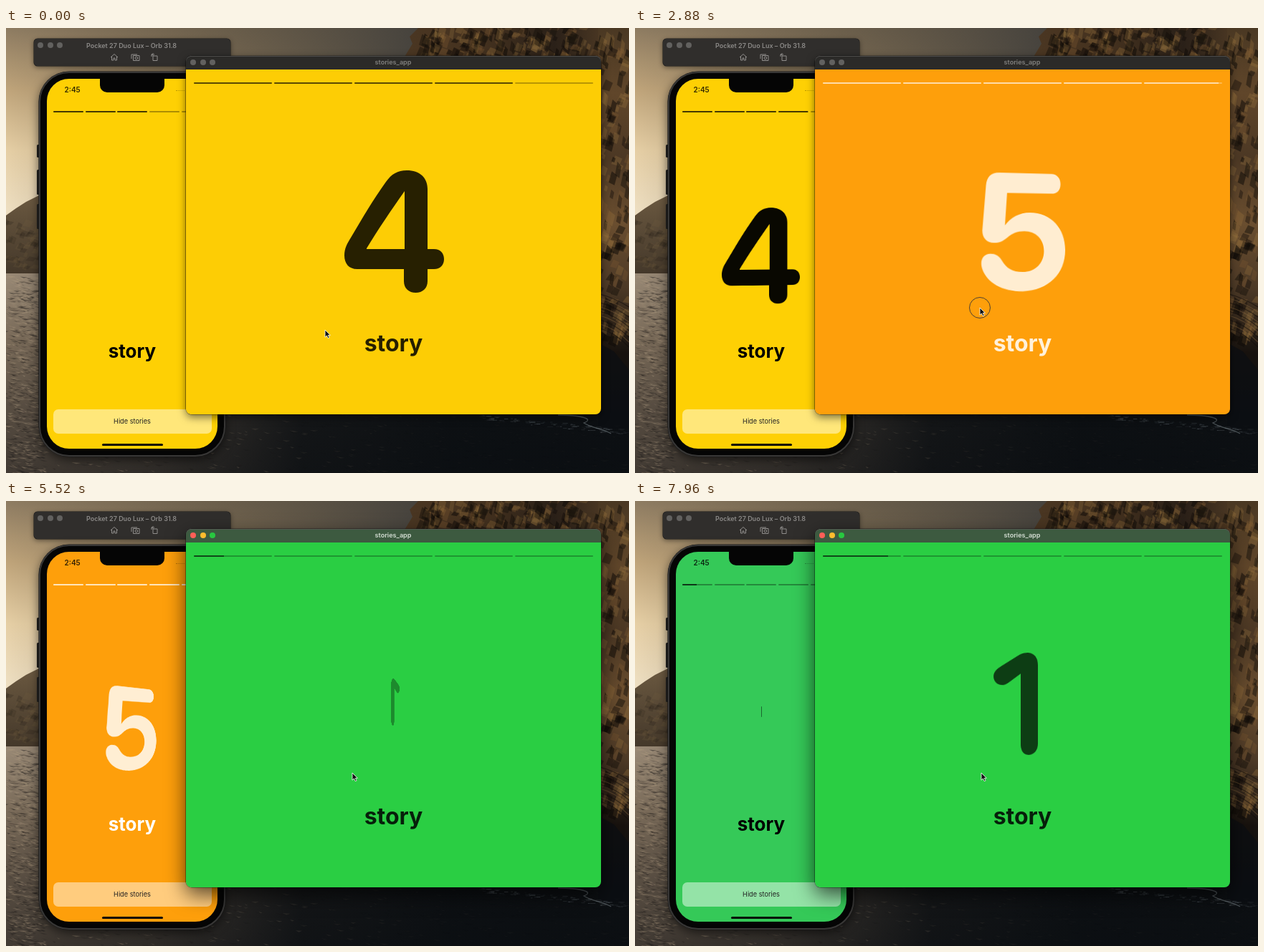
Recreate the animation shown at these times as an HTML page with a canvas. Size 869 by 622 pixels, loop 8000 ms.

```html
<!DOCTYPE html>
<html lang="en">
<head>
<meta charset="utf-8">
<title>Stories</title>
<style>
  html, body { margin: 0; width: 100%; height: 100%; overflow: hidden; background: #17191c; }
  body { position: relative; font-family: Inter, Roboto, sans-serif; }
  #stage { position: absolute; left: 0; top: 0; width: 869px; height: 622px; overflow: hidden; }
  #stage div, #stage svg, #stage canvas { position: absolute; box-sizing: border-box; }
  .center { transform: translate(-50%, -50%); white-space: nowrap; line-height: 1; }
  .light { width: 8px; height: 8px; border-radius: 50%; background: #62615f; }

  #toolbar { left: 39px; top: 15px; width: 274px; height: 38px; border-radius: 5px;
    background: #302e2c; box-shadow: 0 0 0 .5px #1b1a19, 0 2px 7px #0007; }
  #toolbar .center { left: 136px; top: 9px; font-size: 9px; font-weight: 600; color: #8b8987; }
  #toolbar svg { left: 0; top: 0; fill: none; stroke: #8f8d8b; stroke-width: 1; }

  #body { left: 46px; top: 61px; width: 260px; height: 538px; border-radius: 42px; background: #050505;
    border: 2px solid #383736; box-shadow: 0 0 0 .6px #181818, 0 4px 14px #0009; }
  .key { left: 42.5px; width: 4px; border-radius: 1.5px; background: #242321; }
  #phone { left: 57px; top: 71px; width: 238px; height: 517px; border-radius: 31px; overflow: hidden; }
  #notch { left: 74px; top: -4px; width: 90px; height: 23px; border-radius: 0 0 10px 10px; background: #050505; }
  #clock { left: 24.5px; top: 9.5px; font-size: 10px; font-weight: 600; line-height: 1; color: #000c; }
  #signal { left: 180px; top: 15.5px; width: 12px; border-top: 1.5px dotted #0004; }
  #hide { left: 9px; top: 462px; width: 221px; height: 34px; border-radius: 7px; background: #ffffff78; }
  #hide .center { left: 110px; top: 17px; font-size: 9.2px; color: #222; }
  #home { left: 77px; top: 510px; width: 85px; height: 3px; border-radius: 2px; background: #080808; }

  #window { left: 251px; top: 39px; width: 579px; height: 501px; border-radius: 8px;
    box-shadow: 0 0 0 .6px #0009, 0 4px 12px #0008; }
  #window.active { box-shadow: 0 0 0 .6px #0009, 0 10px 28px #000a; }
  #titlebar { left: 0; top: 0; width: 579px; height: 18.5px; border-radius: 8px 8px 0 0;
    background: #2b2a28; box-shadow: inset 0 .7px #5a5957; }
  #titlebar .center { left: 289px; top: 9px; font-size: 9.1px; font-weight: 600; color: #81807e; }
  .active #titlebar .center { color: #d3ddd2; }
  .active .light:nth-child(1) { background: #ff5f57; }
  .active .light:nth-child(2) { background: #febc2e; }
  .active .light:nth-child(3) { background: #28c840; }
  #mac { left: 0; top: 18.5px; width: 579px; height: 482.5px; border-radius: 0 0 8px 8px; overflow: hidden; }

  .bar { height: 2px; border-radius: 1px; overflow: hidden; }
  .bar::before { content: ""; position: absolute; inset: 0; background: currentColor; opacity: .32; }
  .bar div { left: 0; top: 0; height: 2px; background: currentColor; opacity: .6; }
  .digit { width: 200px; height: 200px; overflow: visible; fill: currentColor; }
  .word { font-weight: 700; }
  #cursor, #press { left: 0; top: 0; overflow: visible; }
  #press { width: 30px; height: 30px; margin: -15px; border: 1.4px solid #24283ccc; border-radius: 50%; }
</style>
</head>
<body>
<div id="stage">
  <canvas id="scene" width="869" height="622"></canvas>

  <div id="toolbar">
    <div class="light" style="left:5px;top:5px"></div>
    <div class="light" style="left:18.5px;top:5px"></div>
    <div class="light" style="left:32px;top:5px"></div>
    <div class="center">Pocket 27 Duo Lux – Orb 31.8</div>
    <svg width="274" height="38">
      <path d="M107 26l5-4.5 5 4.5M108.5 25v5h2.5v-3h2v3h2.5v-5"/>
      <path d="M136 28v-6h8M138.500 23.500h8.500v7h-8.500zM141 27a1.800 1.800 0 1 0 3.600 0a1.800 1.800 0 1 0 -3.600 0"/>
      <path d="M166 24h6v6.500h-6zM164 25v-3h4M166.500 20.500l-2.500 1.500 2.500 1.500"/>
    </svg>
  </div>

  <div class="key" style="top:163px;height:18px"></div>
  <div class="key" style="top:198px;height:35px"></div>
  <div class="key" style="top:246px;height:35px"></div>
  <div id="body"></div>
  <div id="phone">
    <div id="notch"></div>
    <div id="clock">2:45</div>
    <div id="signal"></div>
    <div id="hide"><div class="center">Hide stories</div></div>
    <div id="home"></div>
  </div>

  <div id="window">
    <div id="titlebar">
      <div class="light" style="left:6px;top:5px"></div>
      <div class="light" style="left:19.5px;top:5px"></div>
      <div class="light" style="left:33px;top:5px"></div>
      <div class="center">stories_app</div>
    </div>
    <div id="mac"></div>
  </div>

  <div id="press"></div>
  <svg id="cursor" width="12" height="14">
    <path d="M0 0V10.200L2.400 8 4.200 11.600 6 10.800 4.300 7.300H7.400Z" fill="#111" stroke="#fff" stroke-width=".8"/>
  </svg>
</div>

<script>
const $ = id => document.getElementById(id);
const LOOP = 8000, STEP = 40, FOCUS = 2920;

// Digit outlines share the pivot (541, 279).
const DIGITS = {
  1: "M537 353V234L514 250C501 259 488 252 488 241C488 234 493 229 501 224L531 205C539 200 545 198 552 198C565 198 571 206 571 218V353C571 364 564 371 554 371C544 371 537 364 537 353Z",
  4: "M555 354V337H490C478 337 472 329 472 318C472 308 476 301 481 293C497 266 512 240 530 215C538 204 546 199 559 199C577 199 588 209 588 225V309H597C606 309 611 315 611 323C611 331 606 337 597 337H588V354C588 364 581 370 571.5 370C562 370 555 364 555 354ZM556 228C537 255 520 280 503 308V309H556Z",
  5: "M508 203H582C590 203 595 209 595 217C595 226 590 231 582 231H519L516 276C524 265 536 258 551 258C581 258 602 280 602 311C602 345 577 368 541 368C512 368 491 354 485 336C481 324 486 315 496 315C503 315 508 318 512 325C518 335 526 341 541 341C559 341 571 329 571 312C571 295 559 284 543 284C533 284 526 287 519 293C513 298 508 300 501 300C491 300 485 293 485 283L490 221C491 209 497 203 508 203Z"
};
const GROW = { 5: 1.05 };
const DARK = "0,0,0", PALE = "255,255,255";
const THEMES = {
  1: { mac: "#2ace43", phone: "#35c958", ink: DARK, title: "#3d5a40" },
  4: { mac: "#fdcd05", phone: "#fed004", ink: DARK, title: "#5c5130" },
  5: { mac: "#fe9f0b", phone: "#fe9f0b", ink: PALE, title: "#5c4a30" }
};

// Whole part = stories finished, fraction = progress of the current one.
const MAC_RUN = [[0, 4], [2860, 4.953], [3670, 4.953], [4580, 5.257], [5126, 5.257],
  [6200, 5.61], [6500, 5.71], [7585, 5.71], [7960, 5.835]];
const PHONE_RUN = [[0, 3], [2980, 4], [4680, 4.573], [6130, 5], [6200, 5.023], [7960, 5.486]];
const HOLDS = [[2860, 3670], [4580, 5126], [6500, 7585]];
const POINTER = [[0, 445, 422], [1120, 461, 407], [1920, 475, 392], [2500, 481, 391],
  [3670, 481, 391], [4500, 483, 380], [8000, 483, 380]];

function track(keys, t, column = 1) {
  const i = keys.findIndex(k => k[0] > t);
  if (i < 0) return keys[keys.length - 1][column];
  const a = keys[i - 1], b = keys[i];
  return a[column] + (b[column] - a[column]) * (t - a[0]) / (b[0] - a[0]);
}

function add(parent, className, style, html = "") {
  const el = document.createElement("div");
  el.className = className;
  el.style.cssText = style;
  el.innerHTML = html;
  parent.prepend(el);
  return el;
}

function makePlayer(root, o) {
  const fills = [0, 1, 2, 3, 4].map(i => add(root, "bar",
    `left:${o.barX + i * o.barStep}px;top:${o.barY}px;width:${o.barWidth}px`, "<div></div>").firstChild);
  add(root, "word center", `left:${o.x}px;top:${o.wordY}px;font-size:${o.wordSize}px`, "story");
  root.insertAdjacentHTML("afterbegin",
    `<svg class="digit" viewBox="441 179 200 200" style="left:${o.x - 100}px;top:${o.y - 100}px"><path fill-rule="evenodd"/></svg>`);
  const svg = root.firstChild, path = svg.firstChild;

  return units => {
    const done = Math.floor(units) % 5, p = units % 1, story = done + 1, theme = THEMES[story];
    root.style.background = theme[root.id];
    root.style.color = `rgba(${theme.ink},${o.alpha})`;
    fills.forEach((f, i) => f.style.width = 100 * Math.max(0, Math.min(1, done + p - i)) + "%");
    path.setAttribute("d", DIGITS[story]);
    path.setAttribute("transform", `translate(541 279) scale(${GROW[story] || 1}) translate(-541 -279)`);
    svg.style.opacity = p;
    svg.style.transform = `scale(${o.scale * p}) perspective(450px) rotateY(${180 * (1 - p)}deg)`;
    return theme;
  };
}

const showPhone = makePlayer($("phone"), { x: 119, y: 243, scale: .816, alpha: 1,
  barX: 9, barY: 45, barStep: 44.7, barWidth: 42, wordY: 381, wordSize: 26 });
const showMac = makePlayer($("mac"), { x: 289.5, y: 221.5, scale: 1, alpha: .85,
  barX: 11, barY: 18.5, barStep: 112, barWidth: 109, wordY: 383.5, wordSize: 32 });

function paintScene() {
  const c = $("scene").getContext("2d");
  let seed = 11;
  const rnd = (a, b) => {
    seed = (seed * 16807) % 2147483647;
    return a + (b - a) * seed / 2147483647;
  };
  const gradient = (x1, y1, x2, y2, ...colors) => {
    const g = c.createLinearGradient(x1, y1, x2, y2);
    colors.forEach((col, i) => g.addColorStop(i / (colors.length - 1), col));
    return g;
  };
  const shape = (fill, ...pts) => {
    c.fillStyle = fill;
    c.beginPath();
    pts.forEach(p => c.lineTo(...p));
    c.fill();
  };
  const rect = (fill, x, y, w, h) => { c.fillStyle = fill; c.fillRect(x, y, w, h); };
  // A slanted sliver of rock
  const shard = (fill, x, y, w, h) =>
    shape(fill, [x, y], [x + w, y + h * .3], [x + w * .5, y + h], [x - w * .6, y + h * .8]);

  // Sky and distant hill
  rect(gradient(0, 0, 0, 343, "#8d7b61", "#bfa47a", "#e6cfa5", "#eedfc2", "#dcc3a0"), 0, 0, 869, 343);
  rect(gradient(0, 0, 580, 0, "#5a504000", "#5a5040aa", "#45423d"), 0, 0, 869, 343);
  shape(gradient(0, 235, 0, 343, "#6a5840", "#44382a"),
    [0, 262], [14, 252], [28, 243], [46, 234], [60, 230], [60, 343], [0, 343]);
  for (let i = 0; i < 50; i++)
    shard(i % 2 ? "#80694422" : "#20191533", rnd(0, 46), rnd(266, 332), rnd(4, 10), rnd(5, 12));

  // Sea
  rect(gradient(0, 343, 0, 622, "#9a8a76", "#7a6b59", "#5a4f43", "#413a33"), 0, 343, 869, 279);
  rect(gradient(0, 0, 620, 0, "#080c1000", "#080c1055", "#080c10d8", "#080c10f0"), 0, 343, 869, 279);
  for (let i = 0; i < 2200; i++) {
    const x = rnd(-8, 869) * (i % 3 ? 1 : .06), y = rnd(345, 622), w = rnd(4, 14);
    const fade = Math.max(.1, 1 - x / 620), a = .42 * fade * rnd(.4, 1);
    shape(`rgba(${i % 2 ? "22,20,20" : "176,156,130"},${a})`,
      [x, y], [x + w, y + rnd(0, 3)], [x + w * .5, y + 2.4]);
  }

  // Cliff
  shape(gradient(555, 0, 869, 0, "#4a3622", "#45321f", "#2a2018", "#5c4429"),
    [575, 0], [563, 12], [567, 22], [556, 40], [620, 60], [869, 60], [869, 0]);
  rect(gradient(0, 0, 0, 545, "#4a3823", "#60462a", "#4c3824", "#6a4e2f", "#4c3926", "#17120e", "#0c0f12"),
    826, 0, 43, 545);
  const rock = ["#0f0b0888", "#9a723e50", "#1b140e88", "#7a583055", "#0f0b0866", "#c0935030"];
  for (let i = 0; i < 300; i++) {
    const top = i < 170;
    shard(rock[i % 6], top ? rnd(576, 866) : rnd(826, 869), top ? rnd(-6, 36) : rnd(20, 430),
      rnd(3, 11), rnd(6, 24));
  }
  c.lineWidth = 1.2;
  for (let i = 0; i < 9; i++) {
    c.strokeStyle = i % 2 ? "#a77e4c55" : "#120d0a99";
    c.beginPath();
    c.moveTo(829, 372 + i * 6);
    c.quadraticCurveTo(850, 378 + i * 6, 869, 390 + i * 7);
    c.stroke();
  }
  shape("#0b0e12aa", [826, 440], [848, 452], [869, 478], [869, 560], [826, 560]);

  // Foam
  for (let i = 0; i < 90; i++) {
    const x = rnd(660, 866), y = 543 + (x - 660) * .11 + rnd(-4, 4);
    rect(`rgba(160,172,180,${rnd(.04, .25)})`, x, y, rnd(2, 9), 1);
  }
  c.strokeStyle = "#a9b4ba66";
  c.lineWidth = 1.3;
  c.beginPath();
  c.moveTo(770, 541);
  c.bezierCurveTo(800, 541, 822, 546, 806, 552);
  c.bezierCurveTo(816, 559, 833, 560, 844, 567);
  c.stroke();
}

function render(now) {
  const t = Math.floor(((now - start) % LOOP + LOOP) % LOOP / STEP) * STEP;
  showPhone(track(PHONE_RUN, t));
  const theme = showMac(t < STEP ? 3.9999 : track(MAC_RUN, t));
  const active = t >= FOCUS;
  $("window").classList.toggle("active", active);
  $("titlebar").style.background = active ? theme.title : "";
  const at = `translate(${track(POINTER, t, 1)}px,${track(POINTER, t, 2)}px)`;
  $("cursor").style.transform = $("press").style.transform = at;
  $("press").style.visibility = HOLDS.some(([a, b]) => t >= a && t < b) ? "visible" : "hidden";
}

function loop() {
  render(performance.now());
  requestAnimationFrame(loop);
}

paintScene();
const start = performance.now();
loop();
</script>
</body>
</html>
```
